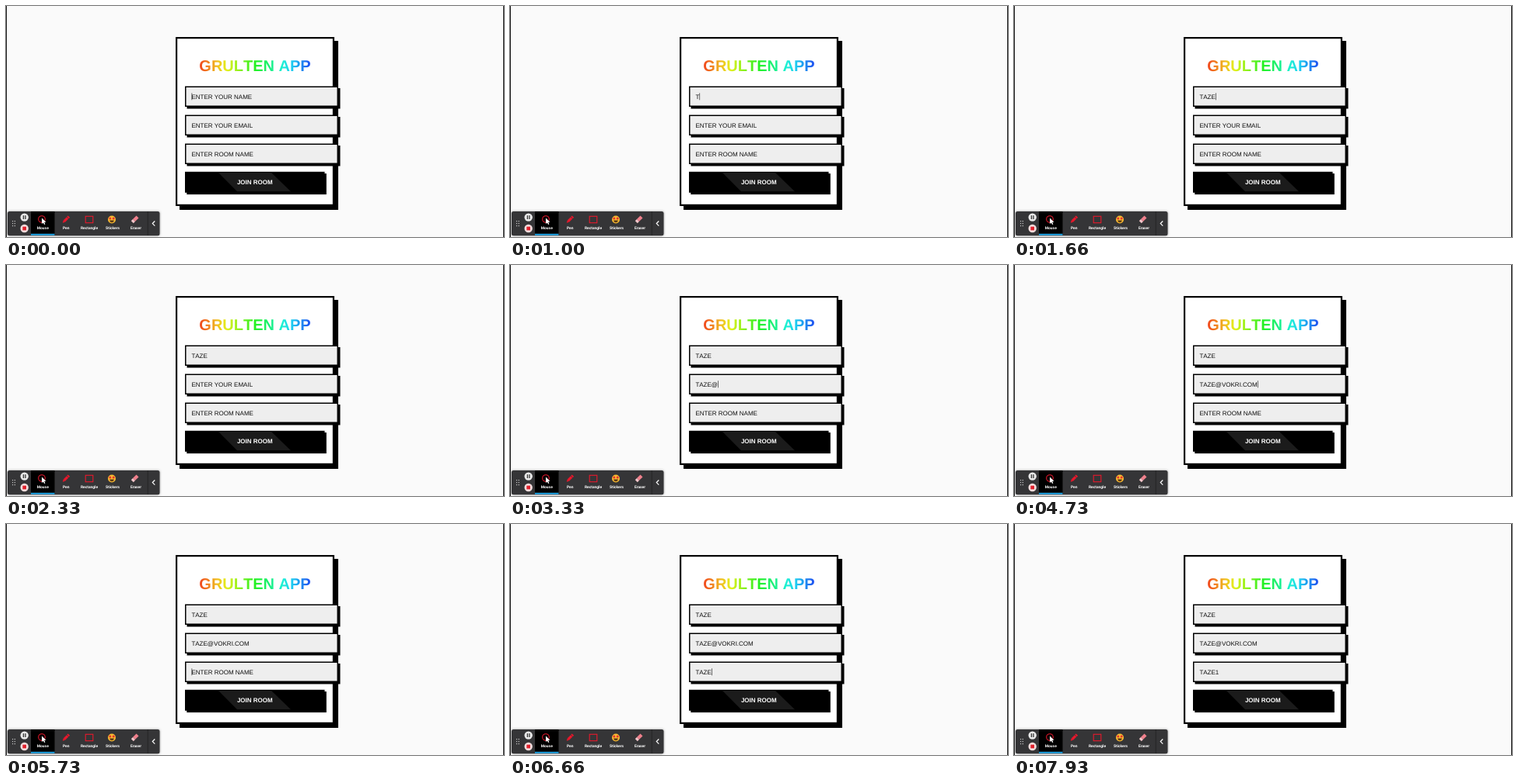
An HTML page with a canvas for the animation above (8 s loop, 640x298 px).

```html
<!DOCTYPE html>
<html lang="en">
<head>
<meta charset="utf-8">
<title>Join room form</title>
<style>
html, body { margin: 0; width: 100%; height: 100%; overflow: hidden; background: #fafafa; }
canvas { display: block; width: 640px; height: 298px; }
</style>
</head>
<body>
<canvas id="stage"></canvas>
<script>
const W = 640, H = 298, LOOP = 8000, BLINK = 530;
const SANS = '"Liberation Sans", Arial, sans-serif';
const canvas = document.getElementById('stage');
const ctx = canvas.getContext('2d');
const dpr = window.devicePixelRatio || 1;
canvas.width = W * dpr;
canvas.height = H * dpr;

// Each field gets focus at a time, then one key per entry in keys.
const fields = [
  { y: 103.5, hint: 'ENTER YOUR NAME', value: 'TAZE', focus: 0,
    keys: [870, 1130, 1330, 1500] },
  { y: 140.5, hint: 'ENTER YOUR EMAIL', value: 'TAZE@VOKRI.COM', focus: 2450,
    keys: [2650, 2800, 2930, 3060, 3260, 3530, 3660, 3800, 3930, 4060, 4200, 4330, 4460, 4600] },
  { y: 177.5, hint: 'ENTER ROOM NAME', value: 'TAZE1', focus: 5500,
    keys: [5900, 6100, 6260, 6400, 6900] }
];

function rect(x, y, w, h, color) {
  ctx.fillStyle = color;
  ctx.fillRect(x, y, w, h);
}

function box(x, y, w, h, border, fill, shadow) {
  rect(x + shadow, y + shadow, w, h, '#000');
  rect(x, y, w, h, '#000');
  rect(x + border, y + border, w - 2 * border, h - 2 * border, fill);
}

function poly(points, color) {
  ctx.beginPath();
  points.forEach(([x, y]) => ctx.lineTo(x, y));
  ctx.closePath();
  ctx.fillStyle = color;
  ctx.fill();
}

function disc(x, y, r, color) {
  ctx.beginPath();
  ctx.arc(x, y, r, 0, Math.PI * 2);
  ctx.fillStyle = color;
  ctx.fill();
}

function text(str, x, y, font, color, align = 'left') {
  ctx.font = font;
  ctx.textAlign = align;
  ctx.fillStyle = color;
  ctx.fillText(str, x, y);
}

function rainbow(x0, x1) {
  const g = ctx.createLinearGradient(x0, 0, x1, 0);
  for (let i = 0; i <= 12; i++) {
    g.addColorStop(i / 12, `hsl(${10 + i * 18}, 88%, 53%)`);
  }
  return g;
}

function drawField(field, t, focused) {
  box(230, field.y, 197, 26.5, 1.5, '#eee', 2.5);
  const typed = field.keys.filter(k => k <= t);
  const value = field.value.slice(0, typed.length);
  text(value || field.hint, 238.4, field.y + 16.3, '8px ' + SANS, '#111');
  if (!focused) return;
  const last = typed.length ? typed[typed.length - 1] : field.focus;
  if ((t - last) % (2 * BLINK) < BLINK) {
    rect(238.6 + ctx.measureText(value).width, field.y + 8.8, 0.6, 9, '#111');
  }
}

function drawForm(t) {
  box(218, 40, 204, 218, 2.2, '#fff', 5);
  text('GRULTEN APP', 320, 84, 'bold 20px ' + SANS, rainbow(248, 391), 'center');
  const active = fields.filter(f => f.focus <= t).pop();
  fields.forEach(f => drawField(f, t, f === active));
  box(230, 213.8, 179.5, 27, 1.5, '#000', 2.3);
  poly([[273, 215], [341, 215], [366, 239.3], [297, 239.3]], '#1b1b1b');
  text('JOIN ROOM', 319.8, 230.2, 'bold 8px ' + SANS, '#fff', 'center');
}

function drawPen() {
  ctx.save();
  ctx.translate(77, 275.5);
  ctx.rotate(Math.PI / 4);
  rect(-1.7, -5.5, 3.4, 2, '#e8182c');
  rect(-1.7, -3, 3.4, 6, '#e8182c');
  poly([[-1.7, 3], [1.7, 3], [0, 6]], '#e8182c');
  ctx.restore();
}

function drawEraser() {
  ctx.save();
  ctx.translate(165.5, 275.5);
  ctx.rotate(Math.PI / 4);
  rect(-2.1, -5, 4.2, 6.5, '#f0808c');
  rect(-2.1, 1.5, 4.2, 3, '#f4c6cb');
  ctx.restore();
}

function drawSmiley() {
  disc(136, 275.5, 5, '#f8b931');
  disc(133.8, 274, 1.5, '#e2352f');
  disc(138.2, 274, 1.5, '#e2352f');
  ctx.beginPath();
  ctx.arc(136, 276.5, 2.7, 0, Math.PI);
  ctx.fillStyle = '#5b3a16';
  ctx.fill();
}

function drawToolbar() {
  ctx.save();
  ctx.shadowColor = 'rgba(0,0,0,0.45)';
  ctx.shadowBlur = 3 * dpr;
  ctx.beginPath();
  ctx.roundRect(2, 265, 195.5, 31.3, 2.5);
  ctx.fillStyle = '#353537';
  ctx.fill();
  ctx.restore();

  for (let i = 0; i < 6; i++) {
    rect(8 + (i % 2) * 2.8, 277 + Math.floor(i / 2) * 3, 1.2, 1.2, '#c4c4c4');
  }
  disc(23.7, 272.6, 5.2, '#e9e9e9');
  rect(21.8, 270.2, 1.3, 4.8, '#333');
  rect(24.3, 270.2, 1.3, 4.8, '#333');
  disc(23.7, 287, 5.2, '#f1dcdc');
  rect(21.4, 284.7, 4.6, 4.6, '#e0202c');

  rect(32, 265, 30.5, 31, '#000');
  rect(32, 293.8, 30.5, 2, '#22a7e8');
  ctx.strokeStyle = '#e8182c';
  ctx.lineWidth = 1.1;
  ctx.beginPath();
  ctx.arc(46, 275, 4.3, 0, Math.PI * 2);
  ctx.stroke();
  poly([[46, 273.5], [46, 281], [47.8, 279.4], [49.1, 282], [50.4, 281.4], [49.2, 278.9], [51.5, 278.7]], '#fff');

  drawPen();
  ctx.strokeRect(102.2, 271.3, 9.6, 8.4);
  drawSmiley();
  drawEraser();

  const labels = ['Mouse', 'Pen', 'Rectangle', 'Stickers', 'Eraser'];
  const centers = [47.3, 77.2, 107, 137, 167];
  labels.forEach((s, i) => text(s, centers[i], 288.4, 'bold 4.9px Roboto, sans-serif', '#fff', 'center'));

  rect(181.8, 265, 0.8, 31, '#202022');
  ctx.strokeStyle = '#fff';
  ctx.lineWidth = 1.2;
  ctx.beginPath();
  ctx.moveTo(191.3, 277.5);
  ctx.lineTo(188.3, 280.6);
  ctx.lineTo(191.3, 283.7);
  ctx.stroke();
}

function draw(t) {
  ctx.setTransform(dpr, 0, 0, dpr, 0, 0);
  ctx.fontKerning = 'none';
  ctx.textRendering = 'geometricPrecision';
  rect(0, 0, W, H, '#fafafa');
  rect(0, 0, 1, H, '#111');
  rect(W - 1, 0, 1, H, '#111');
  drawForm(t);
  drawToolbar();
}

const start = performance.now();
function tick() {
  draw((performance.now() - start) % LOOP);
  requestAnimationFrame(tick);
}
tick();
</script>
</body>
</html>
```
